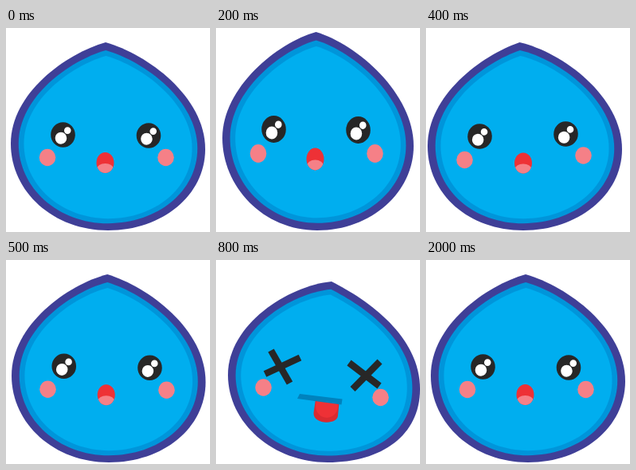
An HTML page with a canvas that plays this animation: 256 by 256 pixels, repeating every 2.1 s.

```html
<!DOCTYPE html>
<html lang="en">
<head>
<meta charset="utf-8">
<title>Dizzy drop</title>
<style>
  html, body { margin: 0; width: 100%; height: 100%; overflow: hidden; background: #fff; }
  canvas { display: block; width: 256px; height: 256px; }
</style>
</head>
<body>
<canvas id="stage" width="256" height="256"></canvas>
<script>
const ctx = document.getElementById('stage').getContext('2d');
const LOOP = 2100, STEP = 60, LEAD = 20, FLOOR = 254;
const INK = '#272727', PINK = '#f58087', RED = '#ee3136';

// tip, left, right: body extremes; base: x of the lowest point;
// eyes and cheeks: left x, y, right x, y; tall: vertical stretch of the face
const rest = { tip: [125, 18], left: [6, 145], right: [250, 152], base: [128],
  eyes: [71.5, 134, 179, 135], cheeks: [52, 162.5, 200.5, 162.5], mouth: [124.5, 169], tall: [1] };
const stretch = { tip: [125.5, 5], left: [8, 138], right: [248, 148], base: [127],
  eyes: [72.5, 127, 178.5, 128], cheeks: [53, 157.5, 199.5, 157.5], mouth: [124.5, 164.5], tall: [1.07] };
const leanLeft = { tip: [117.5, 18], left: [2, 148], right: [246, 152], base: [122],
  eyes: [67.5, 136, 175.5, 133], cheeks: [48.5, 165.5, 197.5, 160], mouth: [122, 169.5], tall: [1] };
const leanRight = { tip: [137, 18], left: [12, 142], right: [255, 154], base: [136],
  eyes: [78, 130.5, 185.5, 137.5], cheeks: [56.5, 159, 205.5, 166.5], mouth: [129.5, 169], tall: [1] };
const tilt = { tip: [145, 29], left: [12, 143], right: [261, 164], base: [138],
  eyes: [80.5, 134.5, 190.5, 145], cheeks: [57.5, 160, 209.5, 173.5], mouth: [132, 173], tall: [0.96] };
const knockedOut = { tip: [145, 27], left: [15, 144], right: [256, 162], base: [140],
  cheeks: [59.5, 160, 206.5, 172.5], tall: [1] };

const KO_START = 13, KO_END = 30;
const keys = [[0, rest], [3, stretch], [6, leanLeft], [10, leanRight], [12, tilt],
  [KO_END, tilt], [33, rest], [36, rest]];

function poseAt(step) {
  if (step >= KO_START && step < KO_END) return knockedOut;
  const i = keys.findIndex(([at], n) => n < keys.length - 1 && step >= at && step < keys[n + 1][0]);
  const [start, from] = keys[i], [end, to] = keys[i + 1];
  const k = (1 - Math.cos(Math.PI * (step - start) / (end - start))) / 2;
  const pose = {};
  for (const part in from) pose[part] = from[part].map((v, n) => v + (to[part][n] - v) * k);
  return pose;
}

function oval(x, y, rx, ry, color) {
  ctx.fillStyle = color;
  ctx.beginPath();
  ctx.ellipse(x, y, rx, ry, 0, 0, 2 * Math.PI);
  ctx.fill();
}

function line(x1, y1, x2, y2) {
  ctx.beginPath();
  ctx.moveTo(x1, y1);
  ctx.lineTo(x2, y2);
  ctx.stroke();
}

function drop({ tip: [ax, ay], left: [lx, ly], right: [rx, ry], base: [bx] }, scale, color) {
  const cx = (lx + rx) / 2, cy = (ay + FLOOR) / 2 + 8;
  const lean = 0.7 * (ax - cx);
  const shoulder = 0.42;
  ctx.save();
  ctx.translate(cx, cy);
  ctx.scale(scale, scale);
  ctx.translate(-cx, -cy);
  ctx.beginPath();
  ctx.moveTo(ax, ay);
  ctx.bezierCurveTo(ax + (lx - ax) * shoulder, ay + 12 - lean, lx, ly - 63, lx, ly);
  ctx.bezierCurveTo(lx, ly + 61, bx - 68, FLOOR, bx, FLOOR);
  ctx.bezierCurveTo(bx + 68, FLOOR, rx, ry + 58, rx, ry);
  ctx.bezierCurveTo(rx, ry - 66, ax + (rx - ax) * shoulder, ay + 17 + lean, ax, ay);
  ctx.fillStyle = color;
  ctx.fill();
  ctx.restore();
}

function eye(x, y, tall, angle) {
  ctx.save();
  ctx.translate(x, y);
  ctx.rotate(angle);
  ctx.scale(1, tall);
  oval(0, 0, 15.3, 15.8, INK);
  oval(-2.5, 4.2, 7.3, 7.5, '#fff');
  oval(5.7, -5.5, 4.3, 4.4, '#fff');
  ctx.restore();
}

function openMouth(x, y, tall) {
  ctx.save();
  oval(x, y, 11, 13 * tall, RED);
  ctx.clip();
  oval(x, y + 8 * tall, 10.5, 7 * tall, PINK);
  ctx.restore();
}

function knockedOutFace() {
  ctx.strokeStyle = INK;
  ctx.lineWidth = 8.5;
  line(69, 113.5, 92.5, 154.5);
  line(61.5, 143, 105.5, 122.5);
  line(167, 129, 205, 158);
  line(205.5, 127.5, 171.5, 162);

  ctx.beginPath();
  ctx.moveTo(125, 175);
  ctx.lineTo(122.5, 192);
  ctx.bezierCurveTo(122, 207, 153, 207, 153, 195);
  ctx.lineTo(154.5, 179);
  ctx.fillStyle = '#d92b31';
  ctx.fill();
  ctx.save();
  ctx.clip();
  oval(139, 183, 14, 15, RED);
  ctx.restore();

  ctx.beginPath();
  ctx.moveTo(105, 168);
  ctx.lineTo(158.5, 174.5);
  ctx.lineTo(157.5, 181.5);
  ctx.lineTo(102, 174);
  ctx.fillStyle = '#0082bd';
  ctx.fill();
}

function draw(time) {
  const step = Math.max(0, Math.floor((time - LEAD + 1) / STEP));
  const pose = poseAt(step);
  const [tall] = pose.tall;
  ctx.fillStyle = '#fff';
  ctx.fillRect(0, 0, 256, 256);
  drop(pose, 1, '#3f3f97');
  drop(pose, 0.92, '#0095da');
  drop(pose, 0.865, '#00aeef');

  const [x1, y1, x2, y2] = pose.cheeks;
  oval(x1, y1, 10.3, 10.7 * tall, PINK);
  oval(x2, y2, 10.3, 10.7 * tall, PINK);
  if (pose === knockedOut) {
    knockedOutFace();
  } else {
    const [ex1, ey1, ex2, ey2] = pose.eyes;
    const angle = Math.atan2(ey2 - ey1, ex2 - ex1);
    eye(ex1, ey1, tall, angle);
    eye(ex2, ey2, tall, angle);
    openMouth(...pose.mouth, tall);
  }
}

function tick() {
  draw(performance.now() % LOOP);
  requestAnimationFrame(tick);
}
tick();
</script>
</body>
</html>
```
